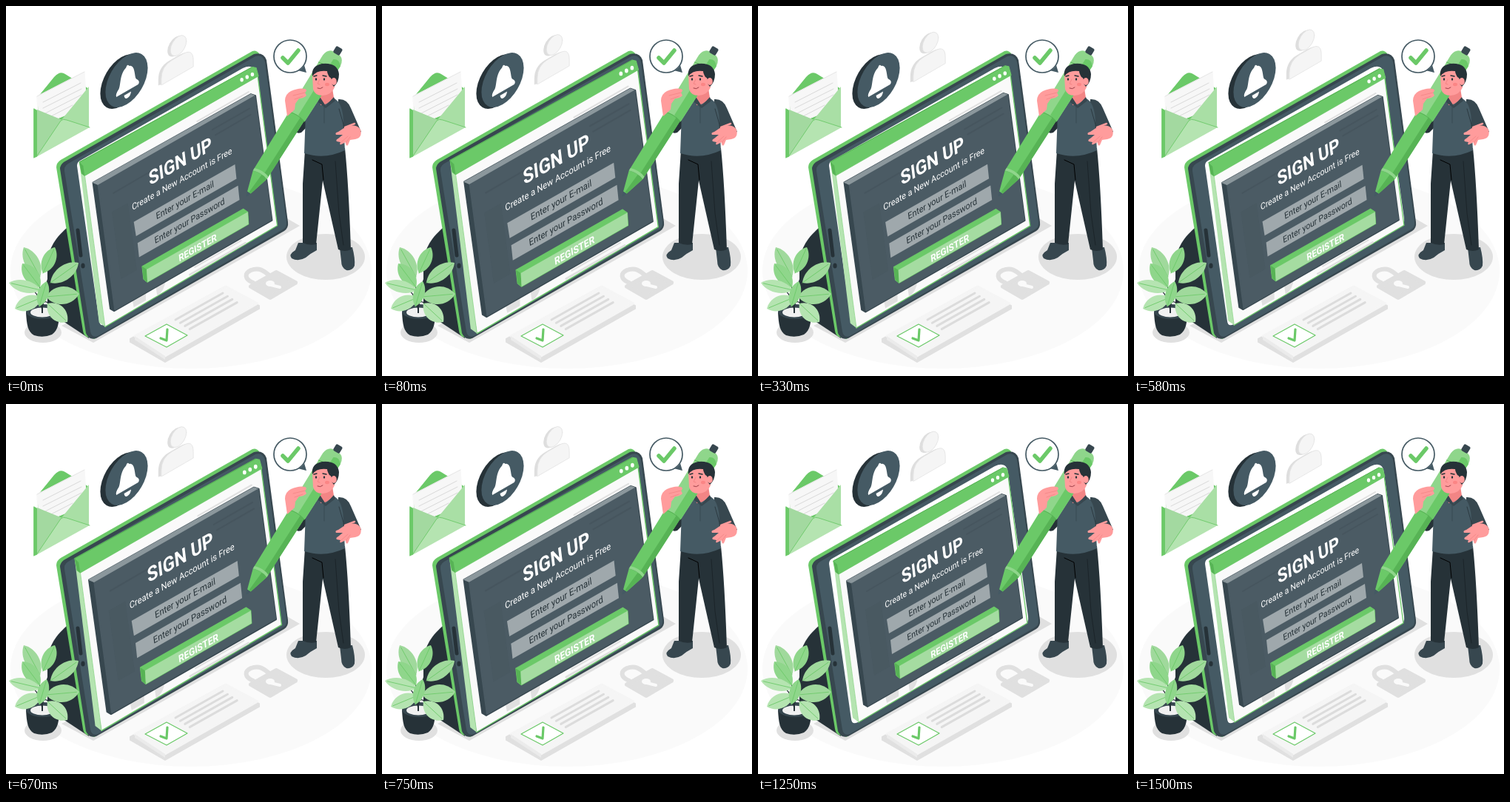
Recreate the animation shown at these times as an HTML page with a canvas. Size 500x500 px, loop 1.54 s.

```html
<!DOCTYPE html>
<html lang="en">
<head>
<meta charset="utf-8">
<title>Sign up</title>
<style>
html, body { margin: 0; width: 100%; height: 100%; overflow: hidden; background: #fff; }
canvas { display: block; width: 500px; height: 500px; }
</style>
</head>
<body>
<canvas id="stage"></canvas>
<script>
const canvas = document.getElementById('stage');
const ctx = canvas.getContext('2d');
const ratio = window.devicePixelRatio || 1;
canvas.width = canvas.height = 500 * ratio;

const LOOP = 1540, CYCLE = 1500, LEAD = 30;
const GREEN = '#6bc968', MID = '#8fd68b', LIGHT = '#b5e4b1', DEEP = '#57b355';
const SLATE = '#455a64', DARK = '#263238', EDGE = '#37474f';
const GREY = '#e0e0e0', PALE = '#f5f5f5', SKIN = '#ff9c9c', BLUSH = '#f28585';

function paint(d, fill, stroke, width = 1) {
  const p = new Path2D(d);
  if (fill) { ctx.fillStyle = fill; ctx.fill(p); }
  if (stroke) {
    ctx.strokeStyle = stroke;
    ctx.lineWidth = width;
    ctx.lineCap = ctx.lineJoin = 'round';
    ctx.stroke(p);
  }
}
// Polygon whose corners are rounded by a stroke of its own colour.
const poly = (points, fill, round = 0) => paint(`M${points}Z`, fill, round && fill, round);
const line = (points, color, width = 1) => paint(`M${points}`, null, color, width);
function oval(x, y, rx, ry, fill, stroke, width = 1) {
  ctx.beginPath();
  ctx.ellipse(x, y, rx, ry, 0, 0, 7);
  if (fill) { ctx.fillStyle = fill; ctx.fill(); }
  if (stroke) { ctx.strokeStyle = stroke; ctx.lineWidth = width; ctx.stroke(); }
}
function within(matrix, draw) {
  ctx.save();
  ctx.transform(...matrix);
  draw();
  ctx.restore();
}
const iso = (x, y, draw) => within([0.866, -0.5, 0, 1, x, y], draw);
function label(text, x, y, font, color) {
  within([0.866, -0.495, 0.12, 1, x, y], () => {
    ctx.font = `${font} Roboto, sans-serif`;
    ctx.fillStyle = color;
    ctx.fillText(text, 0, 0);
  });
}

function floor() {
  oval(250, 358, 244, 132, '#fafafa');
  poly('75,432 118,455 397,297 378,286', GREY);
  oval(432, 339, 53, 31, GREY);
  oval(50, 441, 25, 14, GREY);

  // padlock
  line('334,374 C322,369 322,361 331,357 C342,353 348,357 358,366', GREY, 6);
  poly('331,379 365,360 391,374 357,394', GREY, 6);
  oval(357, 375, 6, 4, '#fafafa');
  line('358,377 370,380', '#fafafa', 4);

  // membership card
  poly('168,450 297,379 342,405 342,409 215,481 168,454', GREY, 2);
  poly('174,446 297,379 340,402 215,473', PALE, 3);
  poly('174,446 215,473 215,478 174,451', '#ebebeb');
  poly('188,446 217,430 245,445 217,461', '#fff');
  line('188,446 217,430 245,445 217,461Z', GREEN, 1.2);
  line('209,449 217,452 218,437', GREEN, 3.2);
  for (let i = 0; i < 4; i++) {
    const x = 229 + i * 6.4, y = 424 + i * 4.2;
    line(`${x},${y} ${x + 64},${y - 36}`, '#dcdcdc', 3);
  }
}

function tablet() {
  paint('M82,300 C65,315 56,330 56,352 L56,412 L112,449 L116,430Z', DARK);
  paint('M68,218 Q68,212 74,208 L333,61 Q338,59 342,64 L340,90 L120,450 L109,447 Q105,445 104,439Z', GREEN);
  paint('M73,220 Q73,215 78,211 L335,65 Q348,62 352,73 L381,292 Q382,300 376,304 L122,449 Q112,452 108,442Z', EDGE);
  paint('M79,223 Q78,217 84,213 L337,68 Q347,65 350,76 L379,291 Q380,299 374,302 L124,446 Q116,449 114,440Z', SLATE);
  paint('M96,216 Q96,211 100,209 L320,84 Q333,78 337,88 L365,287 Q366,295 361,298 L135,430 Q127,434 126,426Z', '#fff');
  line('97,303 101,337', DARK, 5);
  oval(104, 351, 2.6, 3.5, DARK);
}

function pageWindow() {
  poly('102,213 109,229 136,430 128,424', LIGHT);
  poly('109,229 338,97 364,296 136,430', '#fafafa');
  line('338,97 364,296 136,430', GREEN, 1.3);
  line('109,229 136,430', MID, 0.8);
  poly('102,212 331,86 336,87 339,98 109,230 105,227', GREEN, 1);
  poly('102,212 107,217 109,230 105,227', DEEP);
  line('102,212 331,86', DEEP, 1);
  for (let i = 0; i < 3; i++) oval(317 + i * 7, 103 - i * 3.6, 2.2, 2.7, '#fff');

  line('258,158 326,119', GREY, 2);
  line('248,361 322,319', GREY, 2.5);
  line('255,351 316,316', GREY, 2);
  poly('172,394 190,383 190,395 174,404', GREY);
  paint('M203,375 L216,368 Q215,382 205,389Z', GREY);

  // sign-up panel
  poly('120,239 329,122 335,124 357,289 148,409 143,406', EDGE, 2);
  poly('120,239 329,122 334,124 127,242', '#8b979c', 1);
  poly('127,243 334,125 356,288 149,407', '#4b5b64', 2);
  const ghost = 'rgba(38,50,56,.13)';
  line('278,169 327,141', ghost, 2);
  line('282,176 329,149', ghost, 2);
  line('147,253 226,207', ghost, 2);
  poly('145,278 166,266 178,355 157,367', 'rgba(38,50,56,.06)');

  label('SIGN UP', 195, 243, 'bold 25px', '#fff');
  label('Create a New Account is Free', 172, 276, '11.7px', '#fff');
  poly('174,291 308,215 310,234 177,310', '#9fa8ac');
  poly('179,319 312,243 314,262 181,338', '#9fa8ac');
  label('Enter your E-mail', 204, 288, '11.8px', DARK);
  label('Enter your Password', 202, 320, '11.7px', DARK);

  poly('185,350 319,274 325,278 326,294 192,371 187,367', GREEN, 1);
  poly('185,350 191,354 192,371 187,367', DEEP);
  poly('191,354 325,278 326,294 192,371', '#a5dca1');
  label('REGISTER', 234, 344, 'bold 12.6px', '#fff');
}

function envelope() {
  paint('M43,123 L65,96 Q73,87 80,92 L112,112 L112,150 L43,160Z', GREEN);
  poly('42,122 106,89 109,136 45,162', '#f7f7f7', 1);
  line('42,122 106,89', '#e6e6e6', 1);
  [[50, 130, 101, 104], [50, 138, 102, 112], [51, 146, 102, 120], [57, 151, 90, 134]]
    .forEach(([a, b, c, d]) => line(`${a},${b} ${c},${d}`, '#d9d9d9', 1));
  poly('38,139 43,142 43,202 38,205', GREEN, 1);
  paint('M42,140 L76,154 L42,203Z', '#a3d9a0');
  paint('M112,109 L74,155 L112,164Z', '#a9dfa5');
  paint('M41,204 L74,155 Q77,152 82,154 L113,164Z', LIGHT);
  line('41,204 74,155 Q77,152 82,154 L113,164', GREEN, 0.9);
}

function bell() {
  iso(156, 102, () => oval(0, 0, 33, 33, DARK));
  iso(163, 100, () => {
    oval(0, 0, 33, 33, SLATE);
    paint('M-16,15 Q-18,11 -12,6 C-9,2 -11,-13 -1,-17 Q1,-22 4,-17 C14,-14 12,2 15,6 Q22,12 18,15Z', '#fff');
    paint('M-4,19 L7,19 Q6,25 1.5,25 Q-3,25 -4,19Z', '#fff');
  });
}

function avatar(rise) {
  const bust = 'M-25,11 L-25,3 Q-25,-14 -8,-14 L8,-14 Q25,-14 25,3 L25,11Z';
  const part = (dx, dy, fill, edge) => {
    iso(231.5 + dx, 83.5 + dy - rise, () => paint(bust, fill, edge, 0.8));
    iso(233 + dx, 54 + dy - rise, () => oval(0, 0, 12.5, 12.5, fill, edge, 0.8));
  };
  part(-4, 1, '#dedede');
  part(-2, 0.5, '#dedede');
  part(0, 0, PALE, '#e3e3e3');
}

function leaf(x1, y1, x2, y2, width, fill) {
  const length = Math.hypot(x2 - x1, y2 - y1);
  const ux = (x2 - x1) / length, uy = (y2 - y1) / length;
  within([ux, uy, -uy, ux, x1, y1], () => {
    const far = length * 0.75, near = length * 0.25;
    paint(`M0,0 C${near},${-width} ${far},${-width} ${length},0 C${far},${width} ${near},${width} 0,0Z`, fill);
    line(`0,0 ${length * 0.92},0`, GREEN, 0.8);
  });
}

function plant() {
  paint('M27,414 C28,430 29,440 38,445 Q50,449 62,444 C71,438 71,428 73,413Z', DARK);
  oval(50, 413, 23, 10, EDGE);
  oval(49, 414, 16, 6.5, '#f0f0f0');
  [[42, 360], [61, 357], [66, 370], [30, 379], [62, 391], [36, 398], [62, 406]]
    .forEach(([x, y]) => line(`49,414 Q48,390 ${x},${y}`, DARK, 1.3));
  leaf(46, 366, 24, 326, 13, '#a0d99c');
  leaf(50, 361, 66, 326, 12, MID);
  leaf(60, 374, 98, 347, 13, '#a0d99c');
  leaf(46, 380, 22, 348, 13, MID);
  leaf(47, 384, 4, 374, 11, LIGHT);
  leaf(54, 393, 99, 389, 16, '#a0d99c');
  leaf(48, 394, 12, 409, 13, LIGHT);
  leaf(45, 406, 55, 372, 10, MID);
  leaf(56, 402, 83, 427, 14, LIGHT);
}

function bubble() {
  paint('M394,87 Q400,86 403,80 L406,90Z', SLATE);
  oval(384, 68, 22, 22, '#fff', SLATE, 1.7);
  line('374,70 381,77 395,60', GREEN, 5.5);
}

function manBody() {
  // shoes
  paint('M395,320 L420,320 L420,330 Q412,334 405,340 Q395,346 386,341 Q381,336 391,330Z', EDGE);
  paint('M451,327 L468,326 Q472,341 471,351 Q468,358 460,357 Q453,354 453,344Z', EDGE);
  // trousers
  paint('M404,195 L458,192 Q463,240 466,329 Q458,333 449,329 L428,236 L419,322 Q409,324 401,320 L401,240Z', DARK);
  line('429,235 427,214 414,208', '#000', 1);
  line('445,210 450,280 456,323', '#1b2429', 1);
  // arms and shirt
  paint('M408,137 L391,163 Q389,174 399,171 L412,158Z', DARK);
  paint('M449,126 Q461,125 466,138 L480,170 L459,181 L449,158Z', EDGE);
  paint('M424,123 Q407,129 405,145 L403,199 Q431,208 458,195 L456,160 Q456,130 442,124Z', SLATE);
  line('450,139 456,160 457,172', DARK, 0.8);
  line('430,135 430,158', EDGE, 0.8);
  paint('M423,112 L441,111 L443,124 Q434,134 425,134Z', BLUSH);
  paint('M423,121 L432,135 L443,123 L445,128 L432,138 L422,130Z', EDGE);
  // open hand
  paint('M458,164 Q473,158 479,167 Q482,178 472,180 L465,181 L462,188 Q459,190 459,184 L453,187 Q450,188 452,184 L447,183 Q445,181 449,179 L455,174 L446,174 Q444,171 449,170 Z', SKIN);
  line('453,184 462,176', BLUSH, 0.8);
  line('459,185 465,177', BLUSH, 0.8);
  line('458,164 471,159', SKIN, 2.5);
}

function pen() {
  within([0.532, -0.847, 0.847, 0.532, 325, 257], () => {
    poly('0,0 8,-3 8,3', SLATE, 1);
    paint('M6,-2.5 L34,-11 Q38,0 34,11 L6,3Z', GREEN);
    paint('M7,0 L36,2 Q36,7 34,11 L6,3Z', DEEP);
    paint('M34,-11 L130,-12 Q134,0 130,12 L34,11 Q38,0 34,-11Z', GREEN);
    paint('M35,4 L131,5 L130,12 L34,11Z', DEEP);
    paint('M34,-11 Q38,0 34,11 L38,11 Q42,0 38,-11Z', MID);
    paint('M127,-13 L216,-14 Q226,-13 228,-6 L228,6 Q226,13 216,14 L127,13 Q131,0 127,-13Z', MID);
    paint('M130,1 L219,1 Q224,8 216,14 L127,13Z', GREEN);
    line('127,-12.5 Q131,0 127,12.5', DEEP, 1);
    line('205,-14 Q209,0 205,14', DEEP, 0.8);
    poly('229,-3 235,-3 235,3 229,3', EDGE, 4);
  });
}

function manHead() {
  // hand on the pen
  paint('M380,149 L377,128 Q377,119 385,115 Q396,110 404,112 Q408,114 404,117 L406,121 Q402,125 396,125 L391,132 L390,140Z', SKIN);
  line('388,121 404,117', BLUSH, 0.8);
  line('390,126 401,122', BLUSH, 0.8);

  paint('M414,93 Q414,84 429,83 L444,92 L444,110 Q440,120 428,121 Q417,121 415,112Z', SKIN);
  paint('M414,95 Q412,81 427,78 Q448,76 450,92 Q450,103 443,109 L440,105 Q441,97 437,96 Q434,91 434,88 Q420,86 414,95Z', DARK);
  oval(443, 102, 3.8, 5, SKIN);
  oval(419, 99, 1.2, 1.7, DARK);
  oval(430, 99, 1.2, 1.7, DARK);
  line('416,95 420,94', DARK, 1.3);
  line('428,94 433,95', DARK, 1.3);
  line('424,99 421,105 424,106', BLUSH, 1);
  line('421,111 Q425,113 428,110', '#9d3f49', 1);
  oval(434, 106, 3, 2.2, '#fb8585');
}

// Two linear beats followed by a rest.
function beatScale(phase) {
  const beat = (start, peak, end) =>
    Math.max(0, Math.min((phase - start) / (peak - start), (end - phase) / (end - peak)));
  return 1 + 0.1 * (beat(0, 0.1, 0.3) + beat(0.4, 0.5, 0.6));
}

function draw(time) {
  const phase = Math.min(1, ((time + LEAD) % LOOP) / CYCLE);
  ctx.setTransform(ratio, 0, 0, ratio, 0, 0);
  ctx.fillStyle = '#fff';
  ctx.fillRect(0, 0, 500, 500);
  floor();
  tablet();
  const s = beatScale(phase), cx = 238, cy = 260;
  within([s, 0, 0, s, cx * (1 - s), cy * (1 - s)], pageWindow);
  envelope();
  bell();
  avatar(10 * (1 - Math.abs(2 * phase - 1)));
  plant();
  bubble();
  manBody();
  pen();
  manHead();
}

const start = performance.now();
function tick() {
  draw((performance.now() - start) % LOOP);
  requestAnimationFrame(tick);
}
tick();
</script>
</body>
</html>
```
